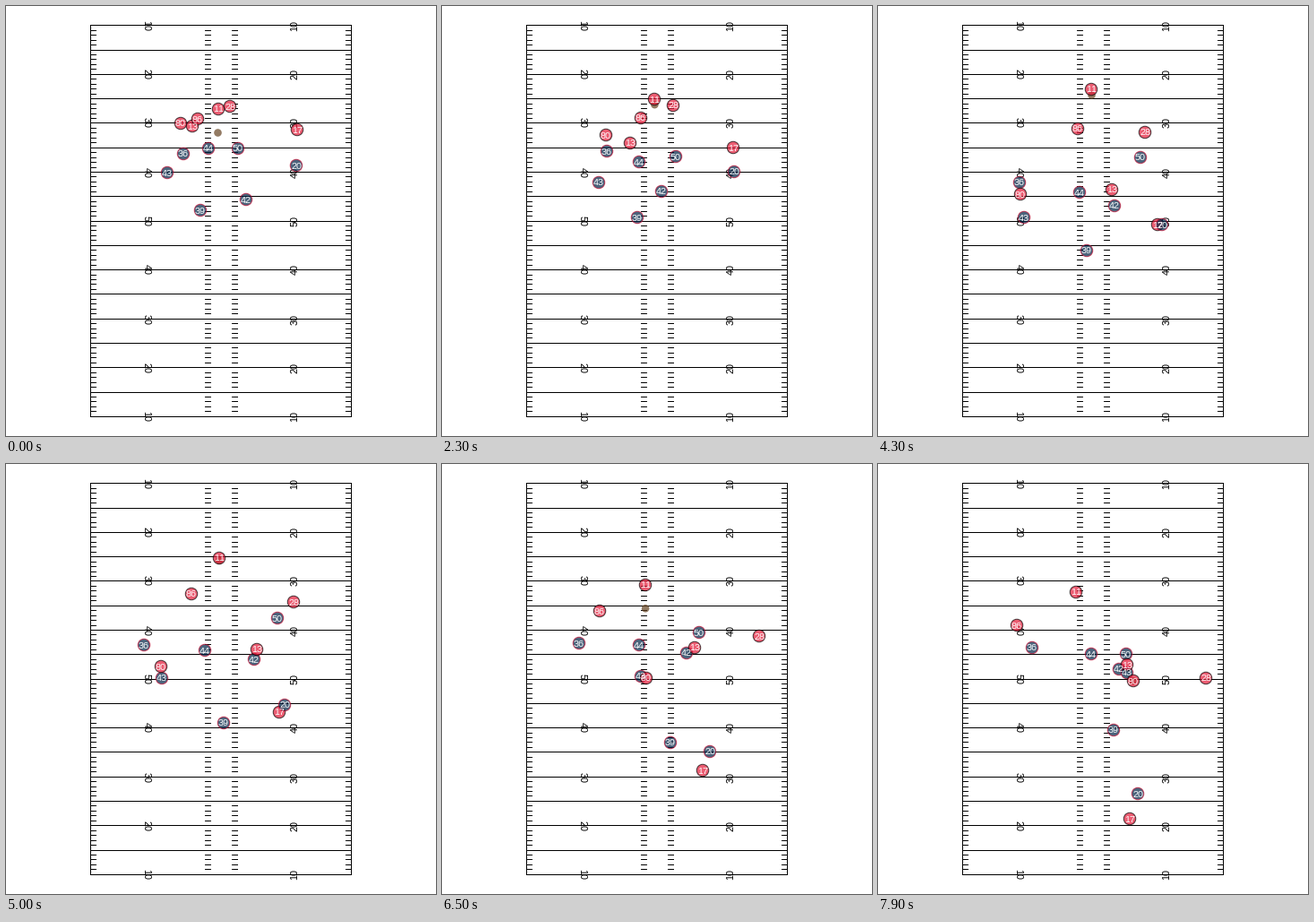
Write a matplotlib script that moves like this. It is 480x480 px and loops after 8 s.

```python
import numpy as np
import matplotlib.pyplot as plt
from matplotlib.animation import FuncAnimation
from matplotlib.collections import LineCollection
from matplotlib.colors import to_rgba
from matplotlib.patches import Circle

SIZE, DPI = 480, 80
PX = 72 / DPI  # points per pixel
FRAMES, STEP = 80, 100
NOW = np.arange(FRAMES) * STEP / 1000

LEFT, RIGHT, TOP, YARD = 94, 385, 21.3, 5.456
RED, BLUE = ("#e31837", "black"), ("#002244", "#c60c30")
ALPHA = 0.7

SNAP, END = 1.4, 7.9
KEYS = np.array([0, SNAP, 3.1, 4.3, 5.8, 7.1, END])  # waypoint times, seconds
CATCH = np.array([286, 250])  # where the play closes in


def ramp(start, stop):
    return np.clip((NOW - start) / (stop - start), 0, 1)[:, None]


def spline(points):
    """Smooth path that stands still until its first waypoint and ends at END."""
    p = np.array(points, float)
    t = KEYS[-len(p):]
    m = np.gradient(p, t, axis=0)
    m[0] = 0
    now = np.maximum(NOW, t[0])
    i = np.clip(np.searchsorted(t, now, side="right") - 1, 0, len(t) - 2)
    h = (t[i + 1] - t[i])[:, None]
    s = (now - t[i])[:, None] / h
    return ((1 + 2 * s) * (1 - s) ** 2 * p[i] + s * (1 - s) ** 2 * h * m[i]
            + s * s * (3 - 2 * s) * p[i + 1] + s * s * (s - 1) * h * m[i + 1])


def run(*points, coast=0.6):
    """Route that keeps a share of its last leg as momentum."""
    p = np.array(points, float)
    return spline([*p, p[-1] + coast * (p[-1] - p[-2])])


def chase(*points):
    """Route that finally turns a few steps towards the catch."""
    p = np.array(points, float)
    way = CATCH - p[-1]
    return spline([*p, p[-1] + 15 * way / np.hypot(*way)])


def cover(man, start, gap, pull):
    """Follow a man while the first distance eases out to the gap."""
    first = np.array(start) - man[0]
    closed = 1 - (1 - ramp(SNAP, END)) ** pull
    return man + first + (np.array(gap) - first) * closed


wideout = run((325, 138), (323, 191), (312, 244), (297, 314), (287, 365))
slot = chase((208, 134), (221, 179), (261, 205), (291, 204), (273, 210))
catcher = run((195, 131), (169, 167), (159, 210), (200, 236), (253, 240))
passer = run((237, 115), (237, 92), (238, 93), (235, 122), (221, 143), coast=0)

DEFENSE = {
    "36": chase((198, 165), (196, 156), (172, 173), (158, 197), (152, 203), (158, 199)),
    "39": chase((217, 228), (222, 249), (233, 273), (253, 305), (256, 310)),
    "42": cover(slot, (268, 216), (-9, 5), 3),
    "43": run((180, 186), (169, 213), (163, 236), (196, 238), (247, 235)),
    "44": chase((226, 159), (215, 193), (225, 208), (217, 205), (226, 203)),
    "50": chase((259, 159), (255, 168), (271, 167), (293, 169), (305, 179), (274, 197)),
    "20": cover(wideout, (324, 178), (9, -28), 1.5),
}
OFFENSE = {
    "13": slot,
    "28": run((250, 112), (272, 115), (298, 141), (345, 170), (358, 213)),
    "80": catcher,
    "86": run((214, 126), (229, 127), (223, 137), (187, 156), (167, 171)),
    "11": passer,
}


def ball_path():
    """Rest, snap to the passer, tuck away on his scramble, throw to the catcher."""
    spot = np.array([236.5, 141.5])
    held = passer + np.array([0.5, 6.5]) * (1 - ramp(4.3, 5.6))
    path = spot + (held - spot) * ramp(1.0, 1.5)
    return path + (catcher - path) * ramp(6.3, 7.1)


def draw_field(ax):
    rows = [round(TOP + YARD * n) for n in range(81)]
    lines = [[(LEFT, y), (RIGHT, y)] for y in rows[::5]]
    lines += [[(x, y), (x + 6, y)] for x in (LEFT, 222, 252, 379) for y in rows]
    lines += [[(x, rows[0]), (x, rows[-1])] for x in (LEFT, RIGHT)]
    # Whole coordinates snap to the middle of their pixel.
    ax.add_collection(LineCollection(lines, colors="black", linewidths=PX,
                                     antialiaseds=False, snap=True, zorder=1))
    for n in range(0, 81, 10):
        mark = 50 - abs(n - 40)
        for x, angle in ((157.5, 270), (321.5, 90)):
            ax.text(x, rows[n] + 0.5, str(mark), rotation=angle, fontsize=11 * PX,
                    ha="center", va="center_baseline", rotation_mode="anchor", zorder=2)


def add_dot(ax, radius, fill, edge, width=PX):
    dot = Circle((0, 0), radius, facecolor=to_rgba(fill, ALPHA), linewidth=width,
                 edgecolor=to_rgba(edge, ALPHA), zorder=3)
    return ax.add_patch(dot)


def add_player(ax, number, path, colors):
    dot = add_dot(ax, 6.75, *colors)
    label = ax.text(0, 0, number, color="white", fontsize=10 * PX, ha="center",
                    va="center_baseline", rotation_mode="anchor", zorder=4)
    return dot, label, np.round(path)


plt.rcParams.update({"font.family": "Liberation Sans", "text.hinting": "native",
                     "text.hinting_factor": 1})
fig = plt.figure(figsize=(SIZE / DPI, SIZE / DPI), dpi=DPI, facecolor="white")
ax = fig.add_axes([0, 0, 1, 1])
ax.set(xlim=(0, SIZE), ylim=(SIZE, 0))
ax.axis("off")

draw_field(ax)
ball = add_dot(ax, 4.3, "#654321", "#654321", 0)
ball_at = ball_path()

players = [add_player(ax, "17", wideout, RED)]
for team, colors in ((DEFENSE, BLUE), (OFFENSE, RED)):
    players += [add_player(ax, number, path, colors) for number, path in team.items()]


def update(i):
    ball.center = ball_at[i]
    for dot, label, path in players:
        dot.center = path[i]
        label.set_position(path[i])


anim = FuncAnimation(fig, update, frames=FRAMES, interval=STEP, repeat=True,
                     repeat_delay=0, blit=False)
plt.show()
```
